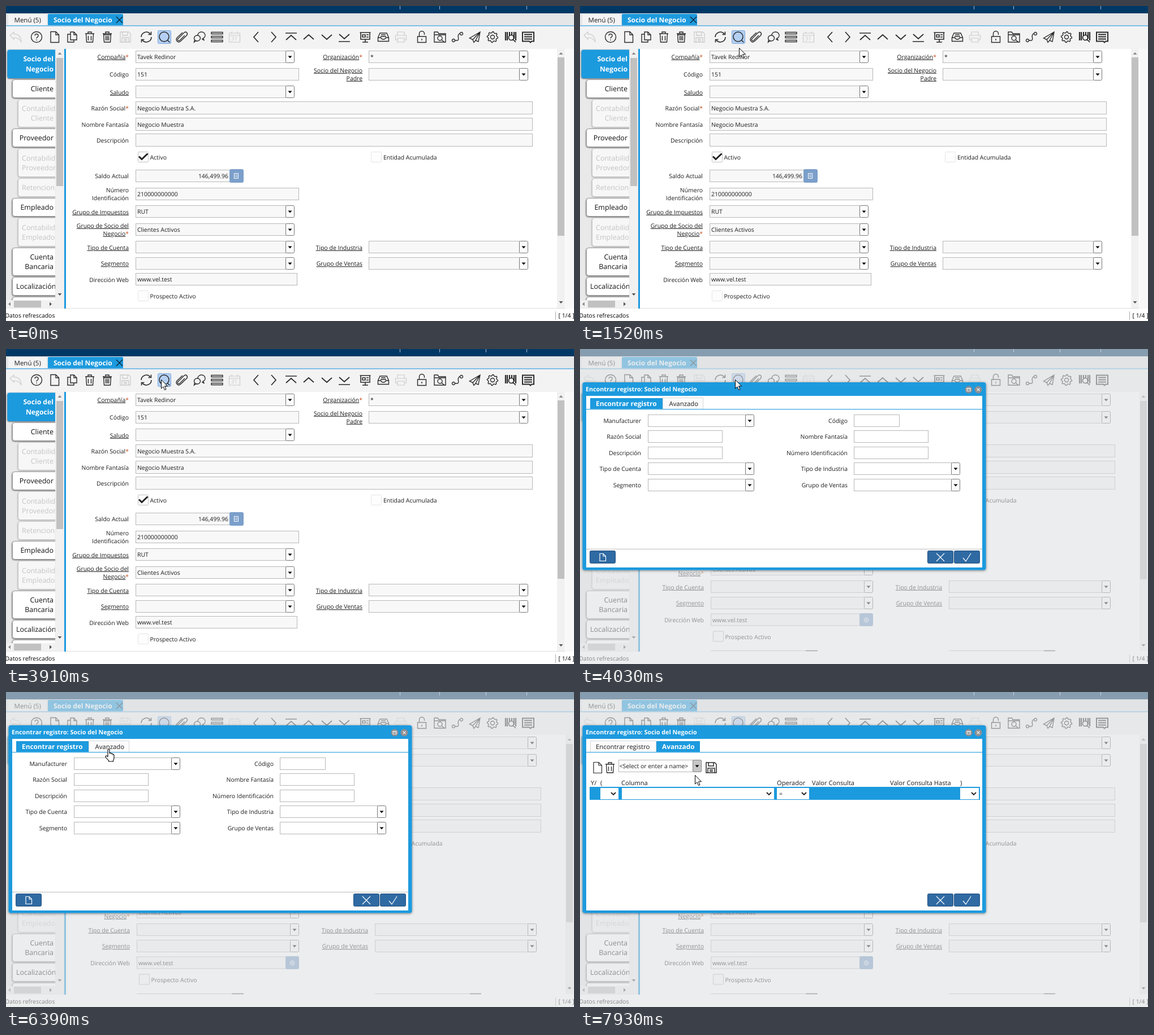
An HTML page for the animation above (8 s loop, 1004 by 558 pixels).

```html
<!DOCTYPE html>
<html lang="es">
<head>
<meta charset="utf-8">
<title>Encontrar registro</title>
<style>
html, body { margin: 0; width: 100%; height: 100%; overflow: hidden; background: #fff; }
svg { display: block; width: 1004px; height: 558px; }
text { font-family: "Open Sans", "Noto Sans", sans-serif; text-rendering: geometricPrecision; white-space: pre; }
.u { text-decoration: underline; }
</style>
</head>
<body>
<svg id="stage" viewBox="0 0 1004 558"></svg>
<script>
const BLUE = '#1c9ade', INK = '#1c1c1c', LOOP = 8000;

// Drawing helpers: each returns SVG markup
const box = (x0, y0, x1, y1, fill, extra = '') =>
  `<rect x="${x0}" y="${y0}" width="${x1 - x0}" height="${y1 - y0}" fill="${fill}" ${extra}/>`;
const edge = (x0, y0, x1, y1, fill, stroke, r = 0) =>
  box(x0 + .5, y0 + .5, x1 - .5, y1 - .5, fill, `stroke="${stroke}" rx="${r}"`);
const line = (d, w = 1.4, c = '#2a2a2a', fill = 'none') =>
  `<path d="${d}" fill="${fill}" stroke="${c}" stroke-width="${w}"/>`;
const fillPath = (d, c = '#000') => `<path d="${d}" fill="${c}"/>`;
const ring = (x, y, r) => `M${x - r} ${y}a${r} ${r} 0 1 0 ${2 * r} 0a${r} ${r} 0 1 0 ${-2 * r} 0`;
const at = (x, y, s) => `<g transform="translate(${x} ${y})">${s}</g>`;
const group = (id, s, attr = '') => `<g id="${id}" ${attr}>${s}</g>`;
const esc = s => s.replace(/</g, '&lt;').replace(/>/g, '&gt;');

function text(x, y, s, { size = 10.45, color = INK, end = false, bold = false, under = false } = {}) {
  const star = s.endsWith('*') && s.length > 1;
  const body = esc(star ? s.slice(0, -1) : s);
  return `<text x="${x}" y="${y + size * .36}" font-size="${size}" fill="${color}"` +
    `${end ? ' text-anchor="end"' : ''}${bold ? ' font-weight="700"' : ''}>` +
    `<tspan${under ? ' class="u"' : ''}>${body}</tspan>${star ? '<tspan fill="#c8501e">*</tspan>' : ''}</text>`;
}

const arrow = (x, y, dx, dy, c = '#555') => dx
  ? fillPath(`M${x + 2 * dx} ${y}l${-4 * dx} -3.5v7z`, c)
  : fillPath(`M${x} ${y + 2 * dy}l-3.5 ${-4 * dy}h7z`, c);

function field(x0, x1, y, value = '', fill = '#f8f8f8', h = 22) {
  return edge(x0, y, x1, y + h, fill, '#b8b8b8') + (value ? text(x0 + 3, y + h / 2 + .5, value) : '');
}
function combo(x0, x1, y, value = '', fill = '#f8f8f8') {
  return field(x0, x1 - 15, y, value, fill) + edge(x1 - 16, y, x1, y + 22, '#fcfcfc', '#777', 2) +
    fillPath(`M${x1 - 11.5} ${y + 9.5}h7l-3.5 4z`);
}
const check = (x, y, c) => edge(x, y, x + 19, y + 19, '#fdfdfd', c, 1);

function scrollbar(x, y0, y1, t0, t1) {
  return box(x, y0, x + 14, y1, '#f1f1f1') + box(x + 1, t0, x + 13, t1, '#c1c1c1') +
    arrow(x + 7, y0 + 8, 0, -1, '#888') + arrow(x + 7, y1 - 10, 0, 1);
}

const PAGE = 'M-7 -9.500h9l5.500 5.500v13.500h-14.500zM2 -9.500v5.500h5.500';
const BIN = 'M-8 -6h16M-3 -6v-3h6v3M-6.500 -6l1 15h11l1 -15M-2.500 -2v8M2.500 -2v8';
const DISK = 'M-9 -9h15l3 3v15h-18zM-5 -9v6h9v-6M-6 9v-8h12v8M-3 4h6M-3 6.500h6';
const cog = () => {
  let d = ring(0, 0, 3.5);
  for (let i = 0; i <= 32; i++) {
    const a = i * Math.PI / 16, r = i % 4 < 2 ? 9.5 : 7.5;
    d += `${i ? 'L' : 'M'}${(r * Math.cos(a)).toFixed(2)} ${(r * Math.sin(a)).toFixed(2)}`;
  }
  return d;
};

// x, path, stroke width, colour
const icons = [
  [17, 'M-10 -3L-3 -9V-5Q9 -6 10 9Q6 1 -3 1V4Z', 1.2, '#ccc'],
  [54, ring(0, 0, 9.5) + 'M-3 -2.500a3 3 0 1 1 4.500 2.600q-1.500 1-1.500 2.400M0 4.500v1.500'],
  [86, PAGE],
  [117, 'M-3 -9h6l5 5v9h-11zM3 -9v5h5M-3 -5h-5v14h11v-4'],
  [148, BIN],
  [179, BIN + 'M0 -2v8M-7 -4h14'],
  [211, DISK, 1.3, '#ccc'],
  [248, 'M-9 0a9 9 0 0 1 16 -5.500M8.500 -9.500v5h-5M9 0a9 9 0 0 1 -16 5.500M-8.500 9.500v-5h5', 1.6],
  [280, ring(-.5, -.5, 8.5) + 'M5.500 5.500l4 4', 1.5],
  [311, 'M5 -3L-4 6q-1.500 1.500-3 0t0-3L4 -8q2.500-2 4.500 0t0 5L-2 7q-3.500 3.500-6.500 .500t0-6.500L1 -8'],
  [342, 'M-3 -3a6.500 6 0 1 1 9 5.500l2.500 3.500l-4.500-2.500M-4 -3a5.500 5 0 1 0 0 10a5.500 5 0 1 0 0-10M-6 6.500l-3.500 2.500l1-4'],
  [373, 'M-10 -8.500h20v3h-20zM-10 -1.500h20v3h-20zM-10 5.500h20v3h-20z', 1.4],
  [404, 'M-9.500 -7h19v16h-19zM-9.500 -3h19M-5 -10v4M5 -10v4', 1.2, '#ccc'],
  [442, 'M4 -9L-4 0L4 9', 1.7], [473, 'M-4 -9L4 0L-4 9', 1.7],
  [504, 'M-10 -7h20M-9 5L0 -3L9 5', 1.7], [535, 'M-9 4L0 -4L9 4', 1.7],
  [567, 'M-9 -4L0 4L9 -4', 1.7], [598, 'M-9 -5L0 3L9 -5M-10 8h20', 1.7],
  [635, 'M-9.500 -8h19M-8 -8v12h16v-12M0 4v5M-5 9h10M-5 -4h5v4h-5zM2 -4h4M2 0h4', 1.6],
  [667, 'M-9.500 1L-6 -7H6L9.500 1V7.500H-9.500ZM-9.500 1h5q1 3 4.500 3t4.500 -3h5M-4 -4h8M-5 -1h10'],
  [698, 'M-6 -3v-6h12v6M-6 5h-3.500v-8h19v8h-3.500M-6 2h12v7h-12z', 1.2, '#ccc'],
  [735, 'M-7.500 -1h15v10.500h-15zM-4.500 -1v-5a4.500 4.500 0 0 1 9 0v2M0 3v3'],
  [767, 'M-10 9v-18h6l2 3h12v15zM-10 -4h20' + ring(0, 2, 4) + 'M3 5l5 4'],
  [798, ring(-7, 6, 2.5) + ring(7, -6, 2.5) + 'M-4.500 6h4q3 0 2-5t2-7h1'],
  [829, 'M9 -9L-9.500 2L-4 4.500L-2 9.500L1 6L6 8ZM9 -9L-4 4.500M9 -9L1 6'],
  [860, cog()],
  [892, 'M-9 -9v15M-6 -9v15M-2 -9v12M2 -9v12M6 -9v12M9 -9v15', 2.2],
  [923, 'M-10 -8.500h20v16h-4l-2 2l-2-2h-12zM-7 -4.500h14M-7 -.500h14M-7 3.500h14', 2],
];

function toolbar() {
  const hot = edge(268, 43, 292, 67, '#b3cff2', '#78a6dc', 2);
  return hot + icons.map(([x, d, w, c]) => at(x, 55, line(d, w, c))).join('') +
    at(892, 55, line(ring(1, 1, 4.5) + 'M4 4l5 5', 1.6, INK, '#f3f3f3')) +
    text(398, 58, '31', { size: 9.5, color: '#ccc' });
}

// left edge, top, bottom, lines, disabled, left-aligned text x
const sideTabs = [
  [11, 130, 163, ['Cliente']],
  [21, 165, 215, ['Contabilid', 'Cliente'], 1],
  [11, 217, 250, ['Proveedor']],
  [21, 252, 303, ['Contabilid', 'Proveedor'], 1, 28],
  [21, 305, 338, ['Retencion'], 1, 28],
  [11, 340, 373, ['Empleado']],
  [21, 375, 426, ['Contabilid', 'Empleado'], 1, 28],
  [11, 428, 478, ['Cuenta', 'Bancaria']],
  [11, 480, 513, ['Localización'], 0, 18],
  [11, 515, 548, []],
];

function sidebar() {
  const tab = ([x, y0, y1, lines, off, lx]) =>
    box(x + .5, y0 + .5, 99, y1 - .5, off ? '#f7f7f7' : '#fff', `stroke="${off ? '#c4c4c4' : '#999'}" rx="4" filter="url(#${off ? 'faint' : 'soft'})"`) +
    lines.map((s, i) => {
      const left = lx || (s === 'Contabilid' && 28), mid = (y0 + y1) / 2 + .3;
      return text(left || 84, mid + (i - (lines.length - 1) / 2) * 17, s,
        { size: 12.5, color: off ? '#c4c4c4' : '#111', end: !left });
    }).join('');
  const white = { size: 12.2, color: '#fff', bold: true, end: true };
  return box(0, 76, 103, 536, '#e9e9e9') +
    `<g clip-path="url(#side)">${box(2.5, 77.5, 99, 128, BLUE, 'rx="4" filter="url(#soft)"')}` +
    text(84, 94, 'Socio del', white) + text(84, 112, 'Negocio', white) +
    sideTabs.map(tab).join('') + '</g>' +
    scrollbar(88, 76, 521, 92, 319) + box(0, 521, 102, 535, '#f1f1f1') + box(14, 522, 62, 534, '#c1c1c1') +
    arrow(6, 528, -1, 0, '#888') + arrow(79, 528, 1, 0);
}

// The record form; "wide" is the layout used once the search window is open
function form(wide) {
  const d = wide ? 2 : 0, e = wide ? 10 : 0, up = wide ? -6 : 0;
  const L = 217 + d, F = 229 + d, C = wide ? 518 : 510, R = 630 + e, G = 641 + e + d / 2, H = wide ? 938 : 923, W = wide ? 946 : 931;
  const tag = (y, s, under) => text(L, y, s, { end: true, under });
  const rtag = (y, s) => text(R, y, s, { end: true, under: true });
  const long = (y, value) => field(F, W, y, value, '#f8f8f8', 23);
  const check1 = wide ? '#b0b0b0' : '#e6e6e6';
  let s = box(106, 76, 1004, 536, '#fff') +
    tag(90, 'Compañía*', 1) + combo(F, C, 79, 'Tavek Redinor') + rtag(90, 'Organización*') + combo(G, H, 79, '*') +
    tag(121.5, 'Código') + field(F, 518, 110, '151') +
    rtag(114, 'Socio del Negocio') + rtag(128, 'Padre') + combo(G, H, 110) +
    tag(153, 'Saludo', 1) + combo(F, C, 141) +
    tag(181, 'Razón Social*') + long(169, 'Negocio Muestra S.A.') +
    tag(210, 'Nombre Fantasía') + long(198, 'Negocio Muestra') +
    tag(238.5, 'Descripción') + long(226) +
    check(233 + d, 258, '#c4c4c4') + line(`M${235 + d} 266.500l5 5l10.500 -10`, 3, '#222') + text(254.5 + d, 268, 'Activo') +
    check(645 + e, 258, check1) + text(667 + e, 268, 'Entidad Acumulada');
  s += at(0, up,
    tag(301.5, 'Saldo Actual') + field(F, 396, 290) + text(393, 301.5, '146,499.96', { end: true }) +
    box(395, 289, 420, 313, '#7b9fca', 'rx="3"') + line('M403.500 296.500h7v9h-7zM405 299.500h4M405 302.500h4', 1, '#fff') +
    tag(326, 'Número') + tag(340, 'Identificación') + field(F, 518, 322, '210000000000') +
    tag(365, 'Grupo de Impuestos', 1) + combo(F, C, 353, 'RUT') +
    tag(389, 'Grupo de Socio del', 1) + tag(403, 'Negocio*', 1) + combo(F, C, 385, 'Clientes Activos') +
    tag(428, 'Tipo de Cuenta', 1) + combo(F, C, 416) + rtag(428, 'Tipo de Industria') + combo(G, H, 416) +
    tag(456.5, 'Segmento', 1) + combo(F, C, 445) + rtag(456.5, 'Grupo de Ventas') + combo(G, H, 445));
  const low = wide ? -4.5 : 0;
  s += at(0, low, tag(485, 'Dirección Web') + field(F, wide ? 495 : 515, 473, 'www.vel.test') +
    check(233 + d, 504, check1) + text(254.5 + d, 514.5, 'Prospecto Activo'));
  if (wide) {
    s += box(494, 468, 518, 491, '#7b9fca', 'rx="3"') + line(ring(506, 480, 4) + 'M502 480h8M506 476v8', 1, '#dbe6f2') +
      line('M231 534.500h189M652 534.500h188', 1, '#bbb') + line('M399 534.500h21M820 534.500h20', 1.5, '#555') +
      scrollbar(989, 76, 535, 92, 408);
  } else {
    s += box(989, 76, 1004, 536, '#f8f8f8') + scrollbar(974, 76, 535, 91, 407) + box(106, 535, 989, 536, '#ddd');
  }
  return s;
}

function frame() {
  const black = { color: '#000' };
  return box(0, 0, 1004, 14, '#003865') +
    [696, 766, 848, 920].map(x => box(x, 0, x + 1, 6, '#a9bccd')).join('') +
    box(0, 13, 1004, 35, '#e4e6e8') + box(4, 15, 72, 35, '#f4f4f4', 'rx="2"') +
    text(14.5, 24.5, 'Menú (5)', { size: 11.5 }) +
    box(74, 14, 207, 35, BLUE, 'rx="2"') +
    text(84, 24.5, 'Socio del Negocio', { size: 11.95, color: '#fff', bold: true }) +
    line('M195 19l11 11M206 19l-11 11', 1.4, '#123') +
    box(0, 36, 1004, 76, '#f3f3f3') + box(0, 34, 1004, 36, '#7fbfe6') + toolbar() + sidebar() +
    group('narrow', form(false)) + group('wide', form(true)) + box(103, 76, 106, 536, BLUE) +
    box(0, 536, 1004, 558, '#fff') + box(971, 541, 972, 556, '#aaa') +
    text(-1.5, 548.5, 'Datos refrescados', black) + text(976.5, 548.5, '[ 1/4 ]', black);
}

function button(x0, x1, d) {
  return edge(x0, 357, x1, 380, '#2f6aa3', '#24527f', 2) + at((x0 + x1) / 2, 369, line(d, 1.2, '#fff'));
}
function tabPair(split, end, second) {
  const blue = second ? [split, end] : [18, split], pale = second ? [18, split] : [split, end];
  const label = (x, s, on) => text(x, 97, s, { size: on ? 11.85 : 11.35, color: on ? '#fff' : INK, bold: on });
  return edge(pale[0], 86, pale[1], 107, '#fbfbfb', '#d8d8d8') + box(blue[0], 87, blue[1], 107, BLUE, 'rx="1"') +
    box(11, 106, 711, 107.5, '#5cb5e4') +
    label(28, 'Encontrar registro', !second) + label(split + (second ? 10 : 11.5), 'Avanzado', second);
}

function simpleTab() {
  const tag = (x, y, s) => text(x, y, s, { end: true });
  const rows = ['Manufacturer', 'Razón Social', 'Descripción', 'Tipo de Cuenta', 'Segmento'];
  const right = ['Código', 'Nombre Fantasía', 'Número Identificación', 'Tipo de Industria', 'Grupo de Ventas'];
  let s = tabPair(146, 218, false);
  rows.forEach((name, i) => {
    const y = Math.round(115.6 + i * 28.5), mid = y + 11.5;
    const input = (x, isCombo, w) => isCombo ? combo(x, x + 188, y, '', '#fff') : field(x, x + w, y, '', '#fff');
    s += tag(108, mid, name) + input(120, i === 0 || i > 2, 132) +
      tag(473, mid, right[i]) + input(484, i > 2, i ? 132 : 81);
  });
  const focus = box(121, 117, 292, 137, '#fff', 'stroke="#111" stroke-width="2" rx="2"') +
    edge(291, 116, 307, 138, '#cfcfcf', '#888', 2) + fillPath('M295.500 125.500h7l-3.500 4z') +
    group('caret', box(123, 120, 124, 134, '#000'));
  return s + group('focus', focus) + box(11, 354, 711, 355, '#bbb') +
    button(17, 63, 'M-5 -6.500h6l4.500 4.500v8.500h-10.500zM1 -6.500v4.500h4.500');
}

function advancedTab() {
  const head = (x, s) => text(x, 161, s, { size: 11.1 });
  const select = (x0, x1, s = '') => box(x0, 170, x1, 190, '#fff') + text(x0 + 4, 180, s) +
    line(`M${x1 - 13} 178l4 4l4 -4`, 1.8, '#222');
  return tabPair(135, 212, true) + at(31, 134, line(PAGE, 1.2)) + at(53, 134, line(BIN, 1.3)) +
    combo(68, 215, 120, '', '#fff') + text(69.5, 131.5, '<Select or enter a name>') +
    group('hover', edge(199, 120, 215, 142, '#c6c6c6', '#888', 2) + fillPath('M203.500 129.500h7l-3.500 4z')) +
    at(232, 134, line(DISK, 1.5)) +
    head(19, 'Y/') + head(36, '(') + head(73, 'Columna') + head(348, 'Operador') + head(410, 'Valor Consulta') +
    head(548, 'Valor Consulta Hasta') + head(672, ')') +
    box(17, 168, 707, 191, BLUE) + select(36, 68) + select(74, 343) + select(348, 405, '=') + select(672, 705);
}

function dialog() {
  const knob = (x, d) => `<circle cx="${x}" cy="72" r="6.5" fill="#8d8f94"/>` + at(x, 72, line(d, 1.2, '#eee'));
  return box(0, 0, 1004, 558, '#e0e1e3', 'opacity=".6"') +
    box(4.5, 59, 717.5, 391.5, BLUE, 'rx="4" filter="url(#drop)"') +
    text(10, 71.5, 'Encontrar registro: Socio del Negocio', { size: 10.75, color: '#fff', bold: true }) +
    knob(687, 'M-3 -2.500h6v5h-6zM-3 -1h6') + knob(704, 'M-2.500 -2.500l5 5M2.500 -2.500l-5 5') +
    box(11, 83, 711, 387, '#fff') + group('simple', simpleTab()) + group('advanced', advancedTab()) +
    button(614, 660, 'M-7 -7l14 14M7 -7l-14 14') + button(661, 707, 'M-7 1l5 6l9 -14');
}

const cursors =
  group('pointer', line('M.5 .5V16L4 12.700L6.500 18.500L9 17.500L6.500 11.700H11.500Z', 1, '#000', '#fff')) +
  group('resize', line('M0 -9.500L4 -5H1.500V5H4L0 9.500L-4 5H-1.500V-5H-4Z', 1, '#fff', '#000')) +
  group('hand', line('M-2 12V1.500Q-2 0 -.500 0T1 1.500V8Q1.500 6.500 3 7T4.300 9Q5 7.500 6.300 8.300T7.200 10Q9 9 9 11.500V16Q9 18 7.500 20V22H-.500V20.500L-6 14.500Q-6.500 12 -4.500 12T-2 14Z', 1.1, '#000', '#fff'));

const shadow = (id, dx, blur, alpha) =>
  `<filter id="${id}" x="-10%" y="-20%" width="120%" height="150%">` +
  `<feDropShadow dx="${dx}" dy="1" stdDeviation="${blur}" flood-opacity="${alpha}"/></filter>`;

const stage = document.getElementById('stage');
stage.innerHTML = '<defs><clipPath id="side"><rect x="0" y="76" width="87" height="445"/></clipPath>' +
  shadow('soft', -.5, 1.3, .6) + shadow('faint', -.5, 1.2, .25) + shadow('drop', 0, 2, .5) + '</defs>' +
  frame() + group('dialog', dialog()) + group('cursor', cursors);

const both = p => p * p * (3 - 2 * p), easeIn = p => p * p, easeOut = p => p * (2 - p);
// start, step count, step length, from, to, easing
const moves = [
  [560, 6, 70, [1044, 571], [369, 222], both],
  [1240, 5, 70, [369, 222], [281, 74], both],
  [2380, 4, 66, [281, 74], [274, 54], both],
  [4890, 3, 70, [274, 54], [228, 70], easeIn],
  [5100, 5, 70, [228, 70], [182, 101], easeOut],
  [7720, 4, 70, [182, 101], [203, 147], both],
];

const part = id => document.getElementById(id);
const show = (id, on) => part(id).setAttribute('display', on ? 'inline' : 'none');
const within = (t, a, b) => t >= a && t < b;

function draw(t) {
  const open = t >= 4030, advanced = t >= 6460;
  show('narrow', !open);
  show('wide', open);
  show('dialog', open);
  show('simple', !advanced);
  show('advanced', advanced);
  show('focus', within(t, 4360, 6260));
  show('caret', within(t, 4360, 4890) || within(t, 5380, 5930));
  show('hover', t >= 7860);

  const move = moves.filter(m => t >= m[0]).pop();
  show('cursor', !!move);
  if (!move) return;
  const [start, n, step, from, to, ease] = move;
  const p = ease(Math.min(n, Math.floor((t - start) / step) + 1) / n);
  const [x, y] = from.map((v, i) => Math.round(v + (to[i] - v) * p));
  part('cursor').setAttribute('transform', `translate(${x} ${y})`);
  const resize = within(t, 4960, 5170), hand = within(t, 5170, 7790);
  show('resize', resize);
  show('hand', hand);
  show('pointer', !resize && !hand);
}

const begin = performance.now();
function tick() {
  draw((performance.now() - begin) % LOOP);
  requestAnimationFrame(tick);
}
tick();
</script>
</body>
</html>
```
